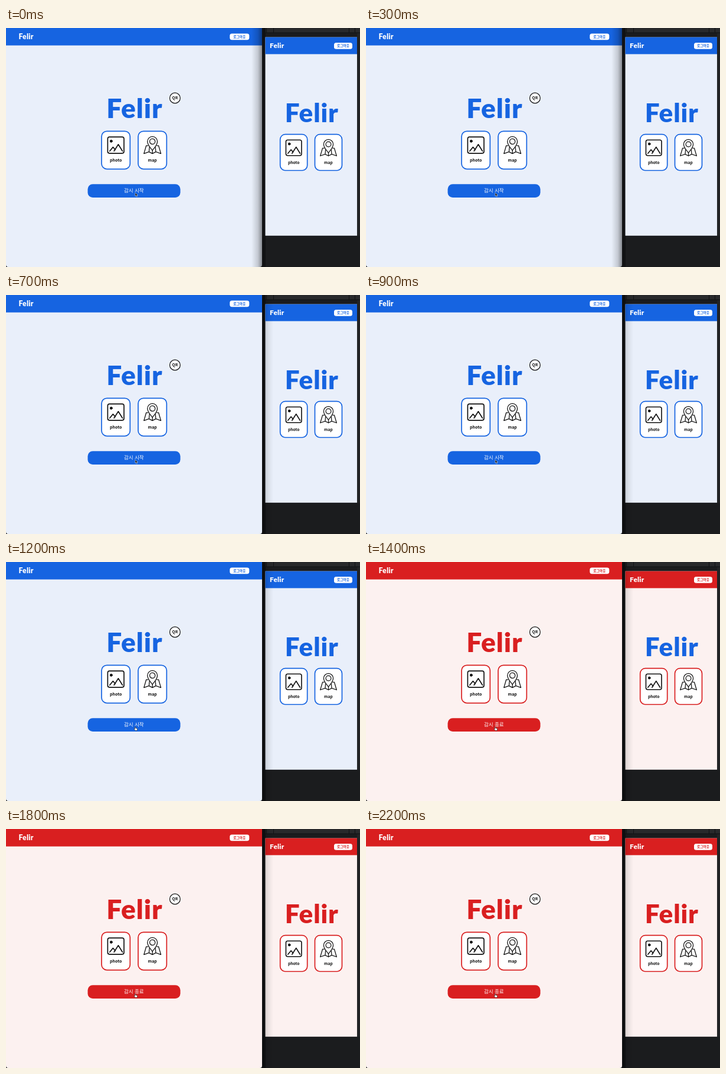
An HTML page that plays this animation: 600x406 px, repeating every 2500 ms.

```html
<!DOCTYPE html>
<html lang="ko">
<head>
<meta charset="utf-8">
<style>
html, body { margin: 0; width: 100%; height: 100%; overflow: hidden; background: #1b1c1e; }
svg { display: block; width: 600px; height: 406px; }
svg { --main: #1664e1; --bg: #e9effa; --late: #1664e1; }
svg.on { --main: #d91f20; --bg: #fcf1f0; }
svg.synced { --late: #d91f20; }
.main { fill: var(--main); }
.bg { fill: var(--bg); }
.card { fill: #fff; stroke: var(--main); stroke-width: 1.7; }
.line { fill: none; stroke: #111; stroke-linejoin: round; stroke-linecap: round; }
text { font-family: "Noto Sans CJK KR", "Noto Sans CJK", "Noto Sans", sans-serif; font-weight: 700; }
.mid { text-anchor: middle; }
.brand { font-family: Lato, sans-serif; font-weight: 900; letter-spacing: .02em; }
</style>
</head>
<body>
<svg id="stage" viewBox="0 0 600 406">
  <defs>
    <linearGradient id="toLeft" x1="1" x2="0">
      <stop offset="0" stop-color="#000" stop-opacity=".42"/>
      <stop offset=".4" stop-color="#000" stop-opacity=".16"/>
      <stop offset="1" stop-color="#000" stop-opacity="0"/>
    </linearGradient>
    <linearGradient id="toRight">
      <stop offset="0" stop-color="#000" stop-opacity=".24"/>
      <stop offset=".5" stop-color="#000" stop-opacity=".08"/>
      <stop offset="1" stop-color="#000" stop-opacity="0"/>
    </linearGradient>
    <g id="photo" class="line" stroke-width="1.7">
      <rect x="-13.8" y="-13.8" width="27.6" height="27.6" rx="3"/>
      <circle cx="-7.8" cy="-6.8" r="2" fill="#111" stroke-width="1"/>
      <path d="M-10.3 10L-4.8 3.4L-1 7.8M-3 10L4.2 -1.2L11.2 10"/>
    </g>
    <g id="map" class="line" stroke-width="1.3">
      <path d="M0 9C-3.5 4-8.4 0-8.4-6.2A8.4 8.4 0 0 1 8.4-6.2C8.4 0 3.5 4 0 9Z"/>
      <circle cy="-6.2" r="4.6"/>
      <path d="M-7.6 .8H-10.4L-14.4 14.4L-5.8 11.4L0 14.4L5.8 11.4L14.4 14.4L10.4 .8H7.6M-5 3.5L-5.8 11.4M5 3.5L5.8 11.4M0 9V14.4"/>
    </g>
  </defs>

  <rect width="600" height="406" fill="#1b1c1e"/>
  <rect x="434" width="6" height="406" fill="#111214"/>
  <rect x="440" width="160" height="8" fill="#28292b"/>
  <path d="M434 8H600M441.5 0V8M453.5 0V8M581.5 0V8M591.5 0V8" stroke="#111214" fill="none"/>
  <rect x="595" y="9" width="5" height="344" fill="#222325"/>
  <rect x="439.5" y="15.6" width="155.5" height="337.2" class="bg"/>
  <rect x="439.5" y="15.6" width="155.5" height="28.8" class="main"/>
  <g id="phone"></g>
  <rect id="shadeRight" x="434" width="19" height="406" fill="url(#toRight)"/>

  <path class="bg" d="M0 0H434V402Q434 406 430 406H4Q0 406 0 402Z"/>
  <rect width="434" height="29.6" class="main"/>
  <g id="desk"></g>
  <circle cx="286.4" cy="119" r="8.9" fill="#fff" stroke="#111" stroke-width="1.2"/>
  <text class="mid" x="286.4" y="121.3" font-size="6.6" fill="#111">QR</text>
  <rect x="138.5" y="265.3" width="157" height="22.8" rx="8.5" class="main"/>
  <text id="action" class="mid" x="216.8" y="279.4" font-size="8.5" fill="#fff" style="font-weight:500"></text>
  <rect id="shadeLeft" x="416" width="18" height="406" fill="url(#toLeft)"/>

  <path id="arrow" d="M219 279.7V285.6L220.4 284.4L221.4 286.6L222.5 286.1L221.5 284H223.3Z" fill="#111" stroke="#fff" stroke-width=".5"/>
  <path id="hand" d="M218.4 280.2Q219.1 279.4 219.7 280.3V282.2L222 282.7Q222.9 283 222.7 284L222.1 286.2H219L217 283.8Q216.9 282.8 218.4 283.5Z" fill="#fff" stroke="#111" stroke-width=".6"/>
</svg>
<script>
const LOOP = 2500;
const FOCUS = 600, HOVER = 1200, START = 1400, SYNC = 1500;
const NAME = "Felir";
const $ = id => document.getElementById(id);

const card = (x, y, w, h, icon, scale) => `
  <rect class="card" x="${x}" y="${y}" width="${w}" height="${h}" rx="${9 * scale}"/>
  <use href="#${icon}" transform="translate(${x + w / 2} ${y + 23.7 * scale}) scale(${scale})"/>
  <text class="mid" x="${x + w / 2}" y="${y + 52 * scale}" font-size="${7 * scale}" fill="#111">${icon}</text>`;

const page = p => `
  <text class="brand" x="${p.small[0]}" y="${p.small[1]}" font-size="${p.small[2]}" fill="#fff">${NAME}</text>
  <rect x="${p.pill[0]}" y="${p.pill[1]}" width="${p.pill[2]}" height="10.8" rx="3.6" fill="#fff"/>
  <text class="mid main" x="${p.pill[0] + p.pill[2] / 2}" y="${p.pill[1] + 7.4}" font-size="5.7" style="font-weight:900">로그아웃</text>
  <text class="brand mid" x="${p.big[0]}" y="${p.big[1]}" font-size="${p.big[2]}" style="fill:var(${p.tint})">${NAME}</text>
  ${card(p.cards[0], p.top, p.w, p.h, "photo", p.scale)}
  ${card(p.cards[1], p.top, p.w, p.h, "map", p.scale)}`;

$("desk").innerHTML = page({
  small: [21.5, 18.8, 12.2], pill: [379.3, 9.4, 33], big: [217.8, 153, 46],
  tint: "--main", cards: [162, 224], top: 175.3, w: 48.3, h: 64.3, scale: 1
});
$("phone").innerHTML = page({
  small: [447, 34.3, 11.8], pill: [556, 25, 31], big: [518.3, 160, 44],
  tint: "--late", cards: [464.7, 523.5], top: 180.7, w: 46, h: 61.3, scale: .96
});

const show = (id, on) => $(id).setAttribute("visibility", on ? "visible" : "hidden");

function draw(t) {
  const on = t >= START;
  $("stage").classList.toggle("on", on);
  $("stage").classList.toggle("synced", t >= SYNC);
  $("action").textContent = on ? "감시 종료" : "감시 시작";
  show("shadeLeft", t < FOCUS);
  show("shadeRight", t >= FOCUS);
  show("arrow", t < HOVER);
  show("hand", t >= HOVER);
}

const begin = performance.now();
function tick() {
  draw((performance.now() - begin) % LOOP);
  requestAnimationFrame(tick);
}
draw(0);
requestAnimationFrame(tick);
</script>
</body>
</html>
```
